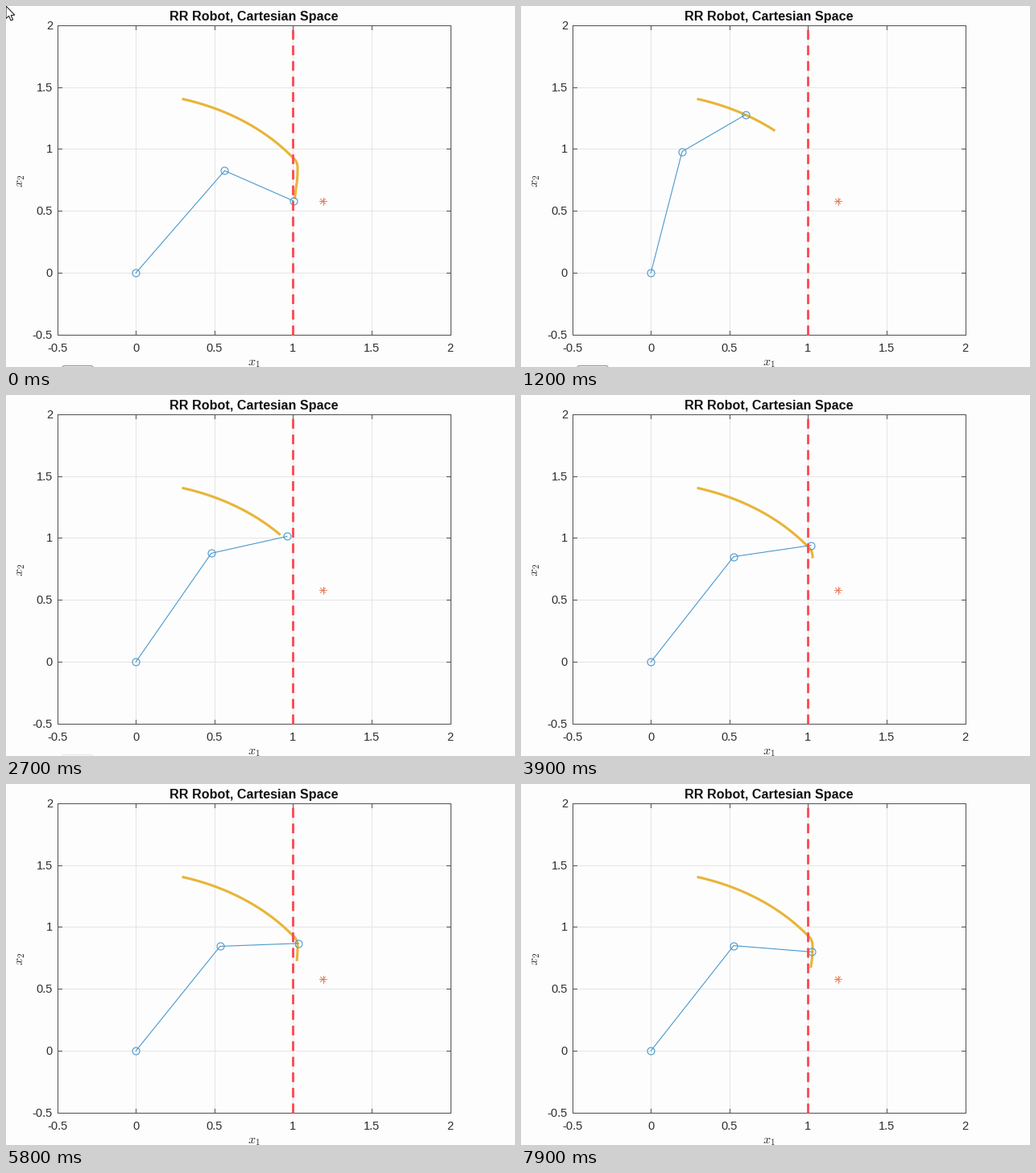
Write a matplotlib script that moves like this. It is 632 px wide and 448 px high and loops after 8 s.

```python
import numpy as np
import matplotlib.pyplot as plt
from matplotlib.animation import FuncAnimation
from matplotlib.patches import FancyBboxPatch, Polygon

W, H, DPI = 632, 448, 100
PX = 72 / DPI
STEP = 100
FRAMES = 80
INK = "#2e2e2e"
FRAME = "#505050"
GRID = "#e4e4e4"
BLUE = "#4a98cb"
plt.rcParams["font.family"] = "Liberation Sans"
plt.rcParams["mathtext.fontset"] = "cm"


def to_px(x, y):
    return 161.2 + 195.2 * x, 331.3 - 153.8 * y


def joints(q1, q2):
    """Pixel points of base, elbow and tip for joint angles in degrees."""
    a, b = np.radians(q1), np.radians(q1 + q2)
    ex, ey = np.cos(a), np.sin(a)
    return to_px(0, 0), to_px(ex, ey), to_px(ex + .5 * np.cos(b), ey + .5 * np.sin(b))


def smooth(t, ts, vs):
    """Monotone cubic interpolation."""
    ts, vs = np.asarray(ts, float), np.asarray(vs, float)
    h, d = np.diff(ts), np.diff(vs) / np.diff(ts)
    m = np.concatenate([[d[0]], np.zeros(len(d) - 1), [d[-1]]])
    for k in range(1, len(d)):
        if d[k - 1] * d[k] > 0:
            m[k] = 2 * d[k - 1] * d[k] / (d[k - 1] + d[k])
    i = int(np.clip(np.searchsorted(ts, t, side="right") - 1, 0, len(h) - 1))
    u = np.clip((t - ts[i]) / h[i], 0, 1)
    return ((1 + 2 * u) * (1 - u) ** 2 * vs[i] + u * (1 - u) ** 2 * h[i] * m[i]
            + u * u * (3 - 2 * u) * vs[i + 1] + u * u * (u - 1) * h[i] * m[i + 1])


# Motion keys: seconds, joint angles, length of the path drawn so far
TIMES = [.2, 1.2, 2.7, 3.9, 5.0, 6.6, 7.9]
Q1 = [90, 78.5, 61.3, 58.2, 57.5, 57.8, 58.2]
Q2 = [-36, -42.1, -45.5, -47.7, -51.5, -58.4, -64]
DRAWN = [0, 105.2, 136.6, 174.3, 187.3, 194.9, 200]

# Path: straight in joint space, then bending down along the wall
lead = [joints(90 - 45 * s, -36 - 24 * s)[2] for s in np.linspace(0, .67, 60)]
bend = [(356, 187.8), (359.2, 191.2), (361.1, 195.1), (362, 199.6), (362, 204.6),
        (361.4, 216.6), (360.3, 224.1), (359.7, 229.1), (358.5, 239.6)]
by = np.linspace(bend[0][1], bend[-1][1], 60)
bx = [smooth(y, [p[1] for p in bend], [p[0] for p in bend]) for y in by]
PATH = np.vstack([lead, np.column_stack([bx, by])])
ARC = np.concatenate([[0], np.cumsum(np.hypot(*np.diff(PATH, axis=0).T))])

fig = plt.figure(figsize=(W / DPI, H / DPI), dpi=DPI, facecolor="#fdfdfd")
ax = fig.add_axes([0, 0, 1, 1])
ax.set_xlim(0, W)
ax.set_ylim(H, 0)
ax.axis("off")


def line(xs, ys, color, width, **kw):
    return ax.plot(xs, ys, color=color, lw=width * PX, **kw)[0]


def label(x, y, text, size=14.67, **kw):
    ax.text(x, y, text, fontsize=size * PX, color=kw.pop("color", INK), **kw)


L, T = to_px(-.5, 2)
R, B = to_px(2, -.5)
for v in np.arange(-.5, 2.1, .5):
    x, y = to_px(v, v)
    if -.5 < v < 2:
        line([x, x], [T, B], GRID, 1, zorder=1)
        line([L, R], [y, y], GRID, 1, zorder=1)
        for edge, s in ((T, 5), (B, -5)):
            line([x, x], [edge, edge + s], FRAME, 1, zorder=2)
        for edge, s in ((L, 5), (R, -5)):
            line([edge, edge + s], [y, y], FRAME, 1, zorder=2)
    label(x, 429, f"{v:g}", ha="center", va="baseline")
    label(58, y + 5, f"{v:g}", ha="right", va="baseline")
line([L, R, R, L, L], [T, T, B, B, T], FRAME, 1, zorder=2)

label(308, 17.6, "RR Robot, Cartesian Space", 16.13, weight="bold",
      color="#111111", ha="center", va="baseline")
label(307.5, 446, "$x_1$", 16, ha="center", va="baseline")
label(19, 216.5, "$x_2$", 16, ha="center", va="center", rotation=90)

# Goal star and wall
gx, gy = joints(45, -60)[2]
for a in np.arange(4) * np.pi / 4:
    r = 4.6 if a % (np.pi / 2) == 0 else 4.2
    dx, dy = r * np.cos(a), r * np.sin(a)
    line([gx - dx, gx + dx], [gy - dy, gy + dy], "#e2754f", .9, zorder=4)
wx = to_px(1, 0)[0]
line([wx, wx], [B, T], "#fc4c57", 2.9, zorder=6, dashes=(12 / 2.9, 7.3 / 2.9),
     dash_capstyle="butt")

trail = line([], [], "#e8b539", 3.1, zorder=3, solid_capstyle="butt", solid_joinstyle="round")
arm = line([], [], BLUE, 1.1, zorder=5, marker="o", markersize=9 * PX,
           markerfacecolor="none", markeredgecolor=BLUE, markeredgewidth=1.1 * PX)

button = FancyBboxPatch((72, 449), 34, 12, boxstyle="round,pad=2.5,rounding_size=3",
                        fc="#f4f4f4", ec="#8a8a8a", lw=PX, zorder=7)
ax.add_patch(button)
cursor = Polygon([(0, 0), (0, 15.5), (3.6, 12.4), (6, 18), (8.6, 17), (6.2, 11.6), (10.8, 11.2)],
                 fc="white", ec="#222222", lw=1.1 * PX, zorder=8)
ax.add_patch(cursor)


def update(i):
    t = i * STEP / 1000
    if i < 2:
        q1, q2, drawn = 55.6, -84.7, ARC[-1]
    else:
        q1, q2, drawn = (smooth(t, TIMES, k) for k in (Q1, Q2, DRAWN))
    arm.set_data(*zip(*joints(q1, q2)))
    s = np.append(ARC[ARC < drawn], drawn)
    trail.set_data(np.interp(s, ARC, PATH[:, 0]), np.interp(s, ARC, PATH[:, 1]))
    cursor.set_visible(i < 2)
    button.set_alpha(1 if t < 1.95 else .2 if t < 2.85 else 0)
    return arm, trail, cursor, button


anim = FuncAnimation(fig, update, frames=FRAMES, init_func=lambda: update(0),
                     interval=STEP, repeat=True, repeat_delay=0, blit=False)
plt.show()
```
